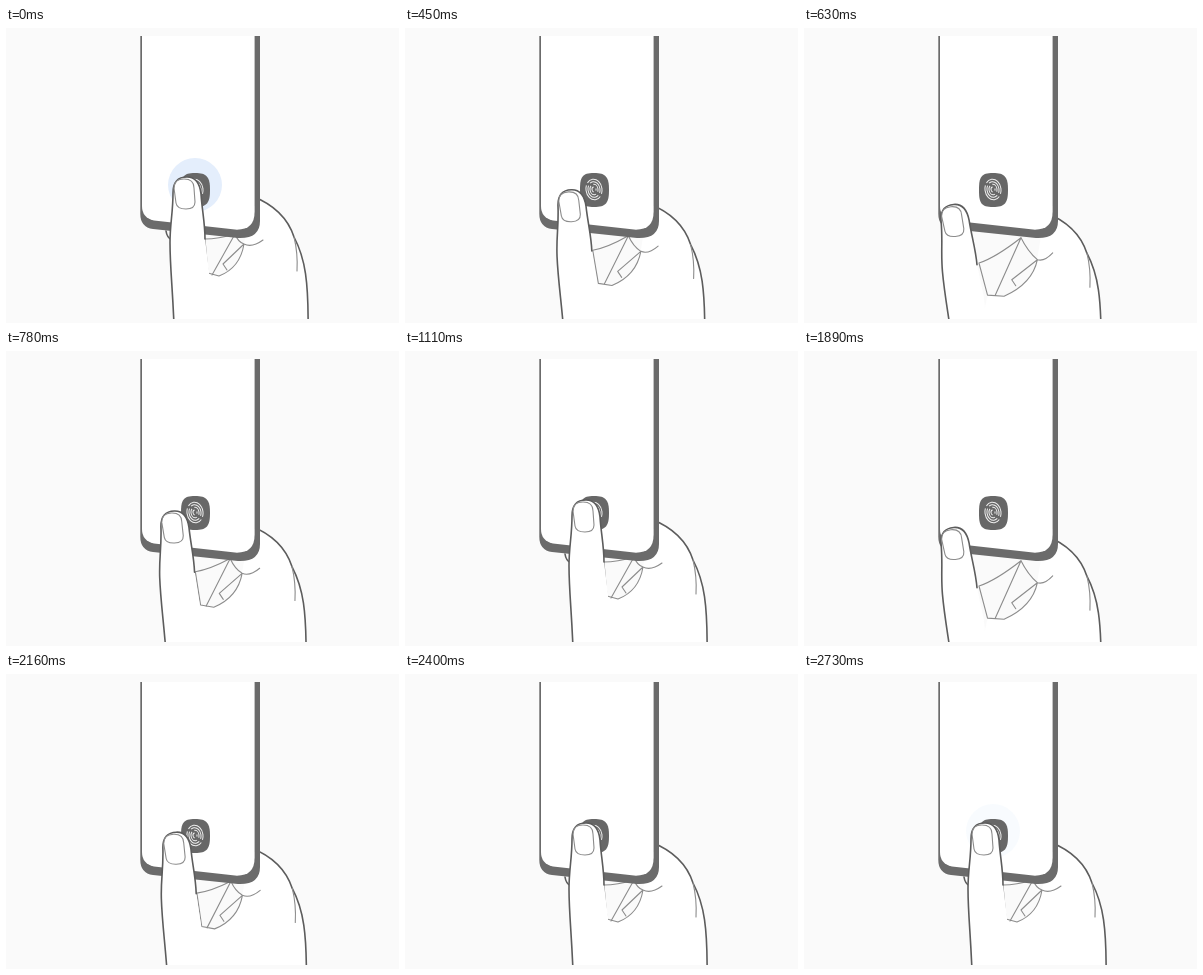
Recreate the animation shown at these times as an HTML page. Size 393 px wide and 295 px high, loop 2.76 s.

```html
<!DOCTYPE html>
<html lang="en">
<head>
<meta charset="utf-8">
<title>Fingerprint scan</title>
<style>
html, body { margin: 0; width: 100%; height: 100%; overflow: hidden; background: #fafafa; }
svg { display: block; width: 100vw; height: 100vh; }
path { stroke-linecap: round; stroke-linejoin: round; }
.skin { fill: #fff; }
.bold { fill: none; stroke: #5c5c5c; stroke-width: 1.6; }
.thin { fill: none; stroke: #8c8c8c; stroke-width: 1.1; }
.ridge { fill: none; stroke: #f0f0f0; stroke-width: 1; }
</style>
</head>
<body>
<svg viewBox="0 0 393 295">
  <clipPath id="stage"><rect y="8" width="393" height="283"/></clipPath>
  <g clip-path="url(#stage)">
    <path id="web" class="skin"/>
    <g id="palm">
      <path class="skin" d="M246 168Q279 181 288 209C299 230 303 252 302 310H238V216Z"/>
      <path class="bold" d="M246 168Q279 181 288 209C299 230 303 252 302 310"/>
      <path class="thin" d="M288 209Q292 225 291 243"/>
    </g>
    <path id="creases" class="thin"/>
    <path class="bold" d="M160 203Q161 210 166 212"/>
    <path fill="#6b6b6b" d="M134.3 0V185Q134 199 147 201L232 210Q254 211 254 193V0Z"/>
    <path class="skin" d="M136 0V178Q136 190 148 192.4L229 201.6Q248.6 202.6 248.6 184V0Z"/>
    <circle id="halo" cx="189" cy="157" r="27" fill="#e4eefc"/>
    <path fill="#676767" d="M189 145C201 145 204 149 204 162S201 179 189 179 175 175 175 162 177 145 189 145Z"/>
    <g id="print" transform="rotate(-8 189 161.5)"></g>
    <g id="thumb">
      <path class="skin" d="M169 330C168 270 164 245 164 215C164 195 167 185 167 165C167 153 172 149 181 149C190 149 194 157 195 166C196 182 199 195 199 211L203 243 205 330Z"/>
      <path class="bold" d="M169 330C168 270 164 245 164 215C164 195 167 185 167 165C167 153 172 149 181 149C190 149 194 157 195 166C196 182 199 195 199 211"/>
      <path class="thin" d="M168 160Q168 151 178 151Q188 151 188 160L189 174Q189 181 180 181Q171 181 170 175Z"/>
    </g>
  </g>
</svg>
<script>
const LOOP = 2760;
const BEATS = [0, 1365, LOOP];
const byId = id => document.getElementById(id);
const clamp = x => Math.max(0, Math.min(1, x));
const ease = x => (x = clamp(x), x * x * (3 - 2 * x));

for (let r = 2; r <= 8; r += 2) {
  const ridge = document.createElementNS('http://www.w3.org/2000/svg', 'ellipse');
  const attrs = {
    class: 'ridge', cx: 189, cy: 161.5, rx: r, ry: r * 1.3,
    'stroke-dasharray': `${r * 3.2} 2.8`, 'stroke-dashoffset': r * 2.5
  };
  for (const name in attrs) ridge.setAttribute(name, attrs[name]);
  byId('print').append(ridge);
}

// How far the thumb has left the sensor, from 0 to 1.
const swing = t => ease((t - 360) / 200) * (1 - ease((t - 570) / 360));

// Halo strength: fast rise before the press, slower fade after it.
const pulse = t => t < 0 ? clamp(1 + t / 60) ** 2 : 1 - ease((t - 30) / 180);

// Skin between thumb and palm stretches, so its points move separately.
function drawWeb(away) {
  const at = (x, y, dx, dy) => `${x + dx * away} ${y + dy * away} `;
  const corner = at(199, 211, -26, 26);
  const base = at(202, 245, -20, 24);
  const knuckle = at(229, 206, -13, 4);
  const end = at(238, 216, -5, 17);
  const fold = at(217, 236, -10, 17);
  const rim = `L${base}L${at(213, 248, -14, 22)}Q${at(234, 240, -6, 17)}${end}`;

  byId('web').setAttribute('d', `M${base}${rim}L270 200V330H170Z`);
  byId('creases').setAttribute('d',
    `M${corner}${rim}` +
    `M${corner}Q${at(212, 211, -22, 20)}${knuckle}` +
    `M${at(206, 247, -16, 22)}L${knuckle}` +
    `M${end}L${fold}l4 6` +
    `M${knuckle}Q${at(232, 214, -9, 10)}${end}Q${at(246, 220, -6, 15)}${at(257, 212, -9, 14)}`);
}

function draw(now) {
  const t = now % LOOP;
  const away = swing(t) + swing(t - BEATS[1]);
  drawWeb(away);
  byId('palm').setAttribute('transform', `translate(${-5.5 * away} ${17.5 * away})`);
  byId('thumb').setAttribute('transform',
    `translate(${-20.6 * away} ${30.4 * away}) rotate(${-5.4 * away} 168 290)`);
  byId('halo').setAttribute('opacity', Math.max(...BEATS.map(beat => pulse(t - beat))));
}

const start = performance.now();
function tick() {
  draw(performance.now() - start);
  requestAnimationFrame(tick);
}
tick();
</script>
</body>
</html>
```
